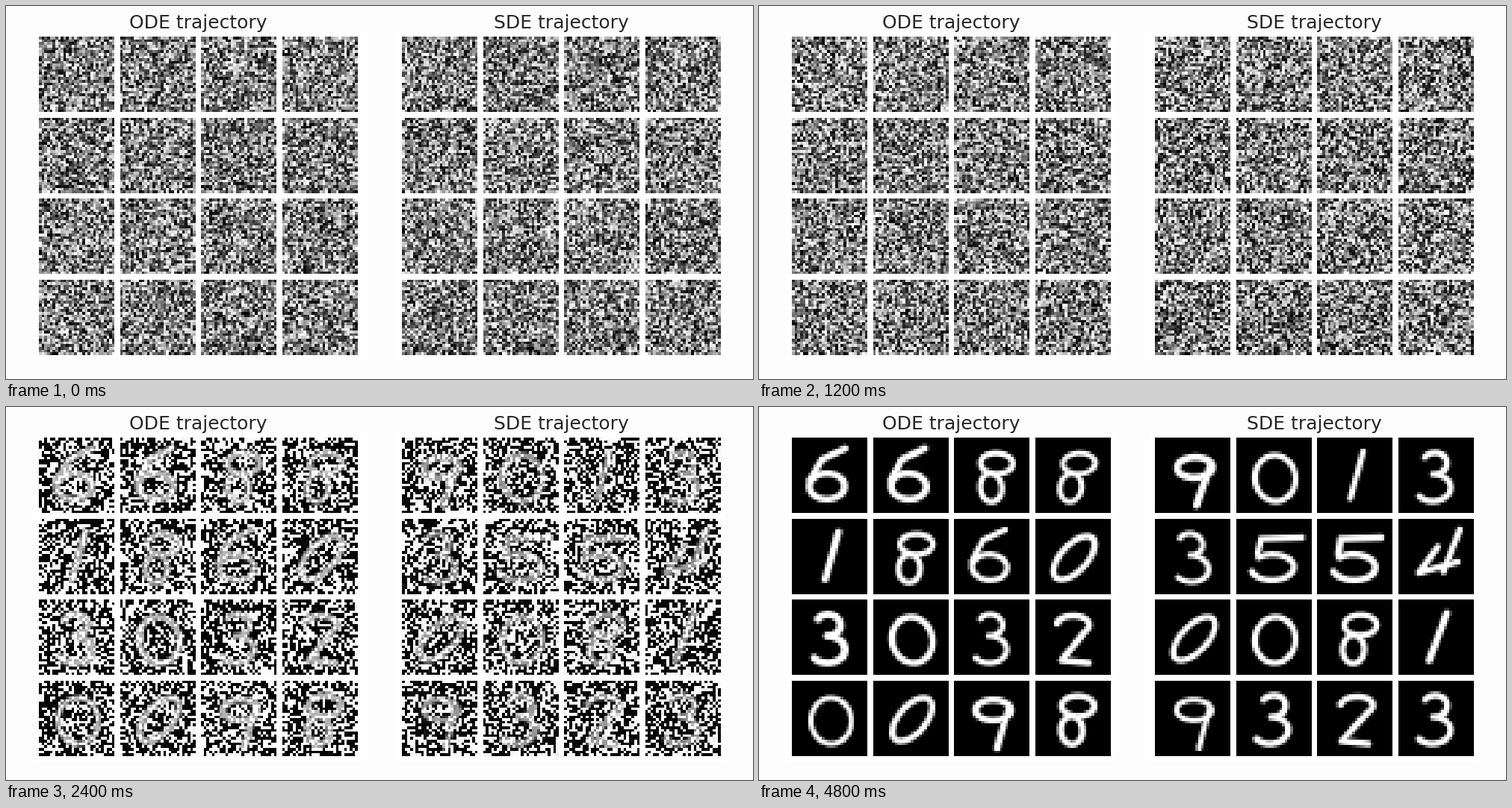
These frames come from a looping animation (1000x500 px, 5000 ms). A matplotlib script:

```python
import numpy as np
import matplotlib.pyplot as plt
from matplotlib.animation import FuncAnimation

W, H, DPI = 1000, 500, 100
FRAMES, INTERVAL = 25, 200
ROWS, SIZE, PAD = 4, 28, 2
STEP = SIZE + PAD
GRID = ROWS * STEP + PAD
SIDE = GRID * 3.6115


def arc(cx, cy, rx, ry, start=0, stop=360):
    a = np.radians(np.linspace(start, stop, 60))
    return np.column_stack([cx + rx * np.cos(a), cy + ry * np.sin(a)])


def line(*points):
    p = np.array(points, float)
    s = np.linspace(0, len(p) - 1, 30 * (len(p) - 1) + 1)
    return np.column_stack([np.interp(s, range(len(p)), axis) for axis in p.T])


# pen strokes in a 28 x 28 cell, y downwards; "o" is the leaning zero
SHAPES = {
    "0": [arc(14.5, 15, 7.5, 8.5)],
    "o": [arc(14.5, 14.5, 6, 8) + 0.55 * np.outer(14.5 - arc(0, 14.5, 0, 8)[:, 1], [1, 0])],
    "1": [line((17.5, 5), (15, 13), (12, 22.5))],
    "2": [arc(14, 9.5, 6, 3.5, 190, 400), line((18.6, 11.7), (10, 22.5), (20, 23.5))],
    "3": [arc(13.5, 9.5, 4.5, 4, 215, 450), arc(13, 18.5, 6.5, 5, 270, 500)],
    "4": [line((14.5, 10.5), (8, 20), (22, 16)), line((22.5, 4), (17, 19.5))],
    "5": [line((24, 7), (9, 7.5), (8, 13)), arc(13.5, 18, 8, 4.8, 230, 520)],
    "6": [line((19.5, 4), (11, 8), (6.5, 16)), arc(13, 18, 6.5, 4.8)],
    "8": [arc(16, 9.5, 6, 3.8), arc(13.5, 18.5, 4, 5.2)],
    "9": [arc(14.5, 11, 6.5, 3.8), line((20.5, 10), (18.5, 16), (16, 25))],
}

rng = np.random.default_rng(7)
yy, xx = np.mgrid[:SIZE, :SIZE] + 0.5


def draw(label):
    """Rasterise one digit with a slightly random pen width and lean."""
    pts = np.vstack(SHAPES[label])
    pen, lean = rng.uniform(2, 2.8), rng.normal(0, 0.05)
    px, py = pts[:, 0] + lean * (14.5 - pts[:, 1]), pts[:, 1]
    dist = np.hypot(xx[..., None] - px, yy[..., None] - py).min(-1)
    return np.clip(pen / 2 + 0.5 - dist, 0, 1)


class Sampler:
    """Digits emerging from noise that fades by `decay` per frame."""

    def __init__(self, labels, decay, end, persistence):
        self.digits = np.array([draw(c) for c in labels])
        self.decay, self.end = decay, end
        fresh = rng.standard_normal((FRAMES, *self.digits.shape))
        self.noise = [fresh[0]]
        for z in fresh[1:]:
            mix = persistence * self.noise[-1] + np.sqrt(1 - persistence**2) * z
            self.noise.append(mix)

    def tiles(self, k):
        sigma = 0.18 * np.exp(-self.decay * (k - 8))
        noise = np.trunc(255 * sigma * self.noise[k]) % 256 / 255  # bytes wrap around
        u = np.clip((k - 7.5) / (self.end - 7.5), 0, 1)
        gain = 1 - (1 - u) ** 3
        cover = gain * np.minimum(1, 2.5 * self.digits)
        return np.clip((1 - cover) * noise + gain * self.digits, 0, 1)

    def mosaic(self, k):
        out = np.ones((GRID, GRID))
        for i, tile in enumerate(self.tiles(k)):
            y, x = PAD + i // ROWS * STEP, PAD + i % ROWS * STEP
            out[y:y + SIZE, x:x + SIZE] = tile
        return out


ode = Sampler("6688" "186o" "3032" "0o98", decay=0.5, end=21, persistence=1)
sde = Sampler("9013" "3554" "o081" "9323", decay=0.38, end=25, persistence=0.7)

fig = plt.figure(figsize=(W / DPI, H / DPI), dpi=DPI, facecolor="#fdfdfd")


def add_panel(sampler, cx, title):
    ax = fig.add_axes([(cx - SIDE / 2) / W, (H - 255 - SIDE / 2) / H, SIDE / W, SIDE / H])
    ax.axis("off")
    fig.text(cx / W, (H - 30) / H, title, ha="center", va="baseline",
             fontsize=18, family="DejaVu Sans", color="#262626")
    return ax.imshow(sampler.mosaic(0), cmap="gray", vmin=0, vmax=1,
                     interpolation="nearest", aspect="auto")


panels = [(ode, add_panel(ode, 257, "ODE trajectory")),
          (sde, add_panel(sde, 743, "SDE trajectory"))]


def update(k):
    for sampler, image in panels:
        image.set_data(sampler.mosaic(k))
    return [image for _, image in panels]


anim = FuncAnimation(fig, update, frames=FRAMES, interval=INTERVAL, repeat=True,
                     repeat_delay=0, blit=False)
plt.show()
```
